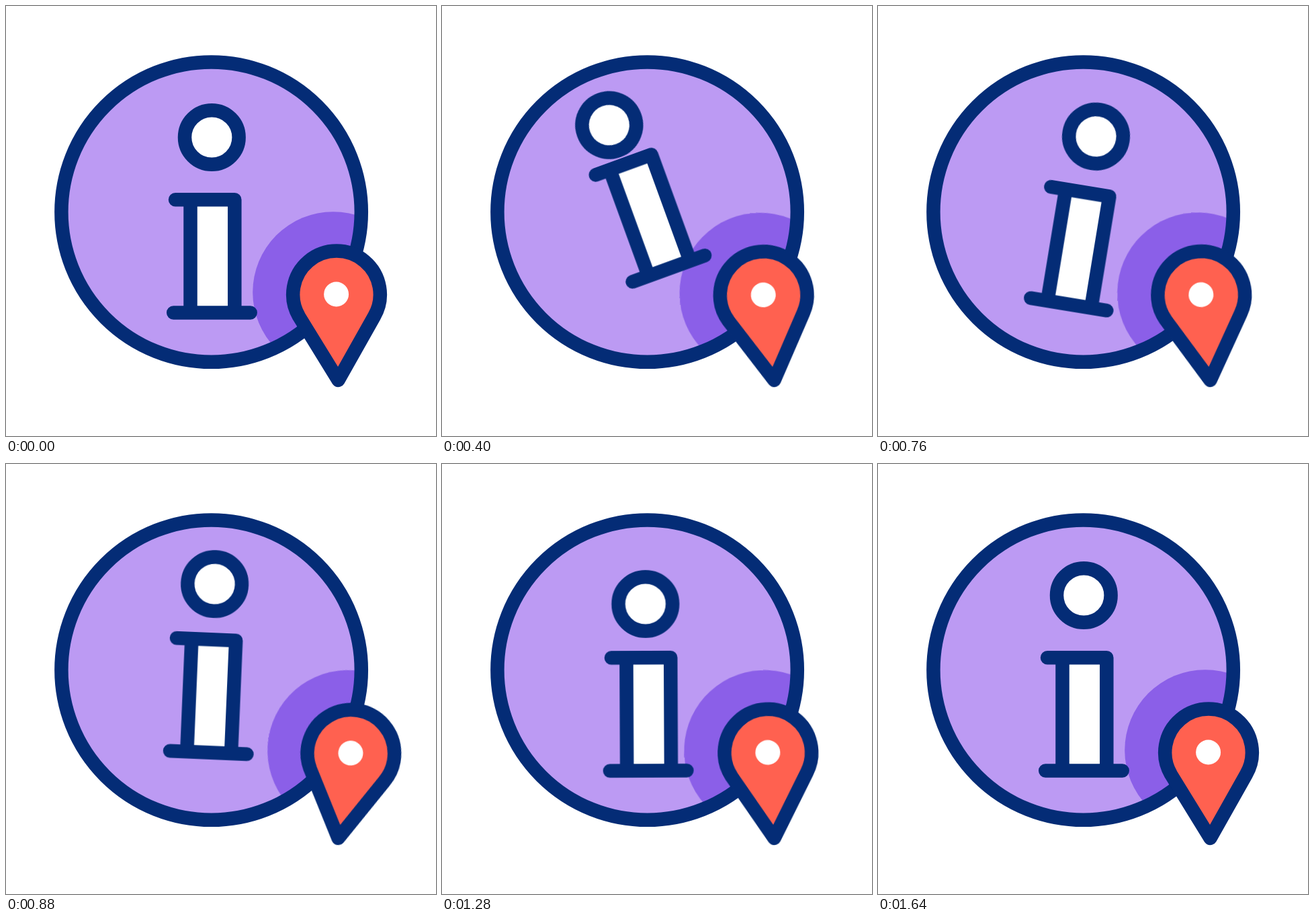
An HTML page without scripts for the animation above (2000 ms loop, 640 by 640 pixels).

```html
<!DOCTYPE html>
<html lang="en">
<head>
<meta charset="utf-8">
<title>Information point</title>
<style>
  html, body { margin: 0; height: 100%; overflow: hidden; background: #fff; }
  svg { display: block; width: 100vw; height: 100vh; }

  .line { stroke: #042c76; stroke-width: 20.5; stroke-linecap: round; stroke-linejoin: round; }
  .none { fill: none; }
  .white { fill: #fff; }

  .sway, .hop, .dot-x, .dot-y, .swing {
    animation: 2s cubic-bezier(.333, 0, .667, 1) infinite;
  }
  .sway { animation-name: sway; transform-origin: 306px 306px; }
  .hop { animation-name: hop; }
  .dot-x { animation-name: dot-x; }
  .dot-y { animation-name: dot-y; }
  .swing { animation-name: swing; transform-origin: 494.5px 557px; }

  @keyframes sway {
    0% { transform: rotate(0deg); }
    20% { transform: rotate(-20deg); animation-timing-function: cubic-bezier(.25, 0, .58, 1); }
    36% { transform: rotate(10deg); }
    52% { transform: rotate(-5deg); }
    66%, 100% { transform: rotate(0deg); }
  }
  @keyframes hop {
    0%, 32%, 64%, 100% { transform: translateY(0); }
    20% { transform: translateY(-60px); }
    47% { transform: translateY(-30px); }
  }
  @keyframes dot-x {
    0%, 39.5%, 74%, 100% { transform: translateX(0); }
    20% { transform: translateX(-10px); }
    53% { transform: translateX(-4px); }
    64% { transform: translateX(-3px); }
  }
  @keyframes dot-y {
    0%, 74%, 100% { transform: translateY(0); }
    20% { transform: translateY(-30px); }
    30% { transform: translateY(17px); }
    44.5% { transform: translateY(-17px); }
    62.5% { transform: translateY(13.5px); }
  }
  @keyframes swing {
    0%, 13.8% { transform: rotate(0deg); }
    31% { transform: rotate(-20deg); }
    45% { transform: rotate(10deg); }
    60% { transform: rotate(-5deg); }
    72% { transform: rotate(2.5deg); }
    82%, 100% { transform: rotate(0deg); }
  }
</style>
</head>
<body>
<svg viewBox="0 0 640 640">
  <defs>
    <circle id="disc" cx="305.6" cy="306.6" r="223.2"/>
    <clipPath id="inside"><use href="#disc"/></clipPath>
  </defs>

  <use href="#disc" fill="#bc9af3"/>
  <g clip-path="url(#inside)">
    <circle class="swing" cx="487" cy="426" r="119.8" fill="#8b5fe8"/>
  </g>
  <use href="#disc" class="line none"/>

  <g class="sway">
    <g class="hop">
      <path class="white" d="M274.5 288.3H340.3V456.6H274.5Z"/>
      <path class="line none" d="M252 288.3H340.3V456.6M274.5 288.3V456.6M249.2 456.6H363.7"/>
    </g>
    <g class="dot-x">
      <circle class="dot-y line white" cx="306.3" cy="195.5" r="40.3"/>
    </g>
  </g>

  <g class="swing">
    <path class="line" fill="#ff6150" d="M494.5 557L436 462A64.8 64.8 0 1 1 548 462Z"/>
    <circle class="white" cx="491.6" cy="429" r="18.5"/>
  </g>
</svg>
</body>
</html>
```
